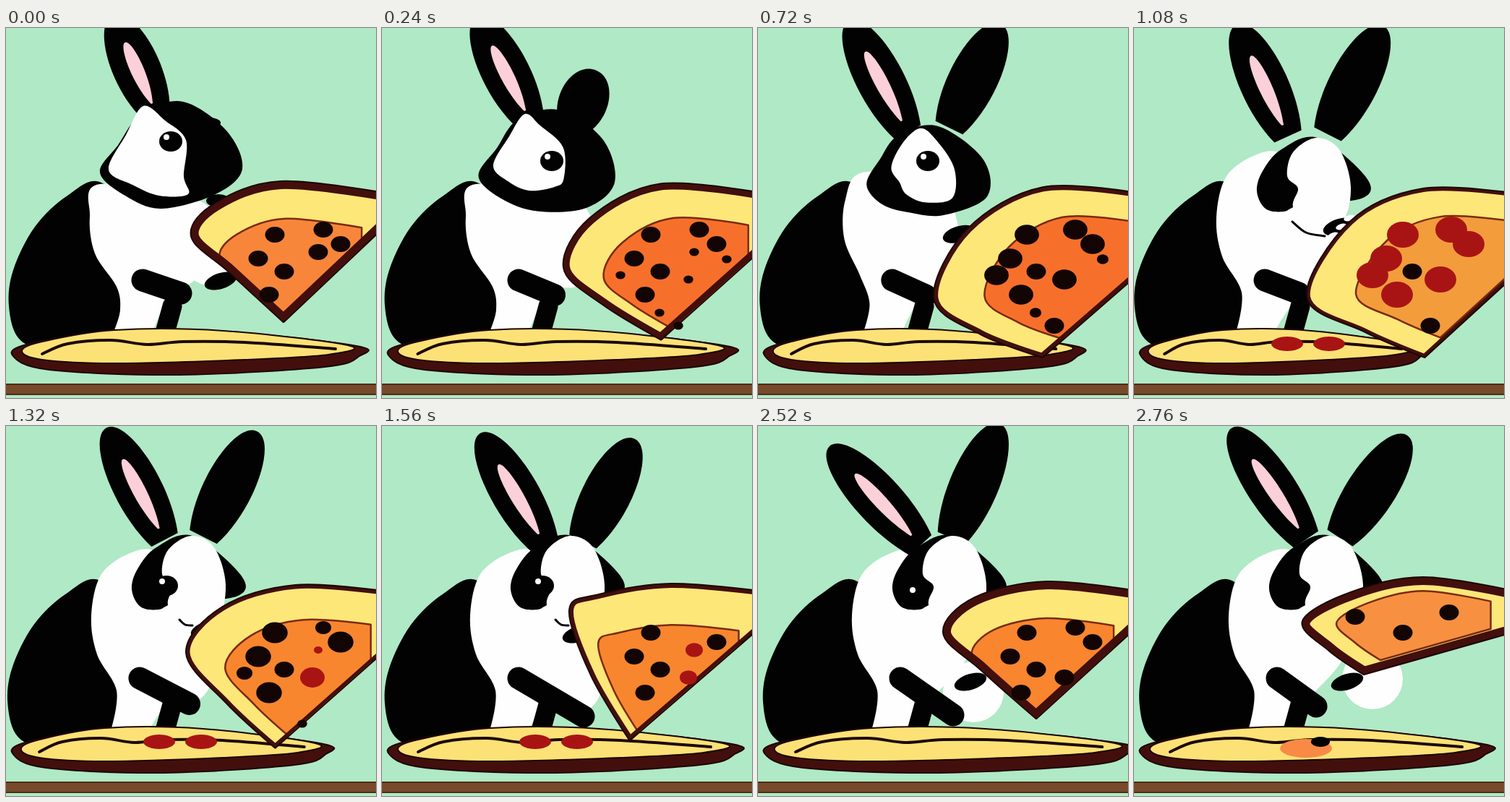
Animation, 512 px wide and 512 px high, one loop 2.88 s. Source, as an HTML page with a canvas:

```html
<!DOCTYPE html>
<html lang="en">
<head>
<meta charset="utf-8">
<title>Rabbit and pizza</title>
<style>
  html, body { margin: 0; width: 100%; height: 100%; overflow: hidden; background: #b0e9c5 }
  canvas { display: block; width: 512px; height: 512px }
</style>
</head>
<body>
<canvas id="stage" width="512" height="512"></canvas>
<script>
const ctx = document.getElementById('stage').getContext('2d');
const LOOP = 2880, STEP = 120;
const BLACK = '#030202', WHITE = '#fefefe', RED = '#a81414', CRUST = '#430f0c', CHEESE = '#fde779';

// Outlines are "x y" points of smooth curves; "!" marks a sharp corner.
const BODY = '132 214 85 232 40 275 10 335 4 385 18 430 60 445 150 440 190 280';
const SIDE_CHEST = '130 216 116 260 123 312 153 358 158 390 150 418! 204 418! 225 375 265 345 290 300 270 240';
const views = {
  profile: {
    chest: SIDE_CHEST,
    head: '188 118 155 162 130 200 165 232 215 250 290 230 327 195 305 142 245 102',
    face: '190 108 166 148 142 196 175 217 212 232 252 230 246 205 249 155 220 128'
  },
  turned: {
    chest: SIDE_CHEST,
    head: '188 135 163 170 137 210 165 240 215 257 275 268 317 232 305 165 245 125',
    face: '205 130 186 152 166 185 175 208 195 218 225 210 257 212 252 175 218 142'
  },
  front: {
    chest: '178 175 136 205 122 262 130 316 157 366 150 418! 204 418! 225 385 285 310 262 220 215 175',
    head: '212 168 186 198 178 226 190 250 215 254 240 245 325 235 328 205 262 152',
    face: '260 152 228 172 220 205 235 222 228 248 248 288 295 270 308 220 292 168'
  }
};
const RIM = '9 453 32 437 140 421 300 420 484 440 488 454 440 469 240 480 60 473';
const PLATE_CHEESE = '22 447 50 434 150 418 300 419 472 439 445 452 330 459 150 464 50 459';
const PLATE_LINE = '50 451 85 437 145 432 195 438 245 434 330 435 455 444';
const TOPPINGS = '349 319 372 286 439 279 463 299 385 337 364 369 424 348 330 342 384 394 410 412 477 320 432 310 306 264 436 258';

// ears: base and tip of each; slice: left, shoulder, top, tip, lower edge;
// tops: one letter per topping place (b black, r red).
const poses = [
  { time: 0, view: 'profile', sway: '0', color: '#f8863a', tops: 'bbbbbb.....b..',
    earL: '208 118 148 -18', earR: '265 145 262 125', eye: '222 151',
    thigh: '285 315', hand: '242 367', paw: '297 350', nose: true,
    slice: '257 288 290 243 380 213 384 406 310 338', right: '268',
    sauce: '395 395', rim: '10', plate: '490' },
  { time: 480, view: 'turned', sway: '0', color: '#f7702b', tops: 'bbbbbbbbbbb...',
    earL: '203 140 115 -14', earR: '262 132 330 -8', eye: '229 178',
    thigh: '230 320', hand: '235 372', paw: '274 292',
    slice: '247 375 285 285 390 220 388 455 300 425', right: '335',
    sauce: '500 370', rim: '6', plate: '473' },
  { time: 1080, view: 'front', sway: '-8', color: '#f39c3c', tops: 'rrrrbrrr.b....', big: 22,
    earL: '213 150 142 -5', earR: '268 147 345 -3', mouth: '219 268 238 283 264 288',
    thigh: '225 330', hand: '228 367', paw: '284 275', toes: true, reds: true,
    slice: '240 372 300 268 400 223 402 455 320 420', right: '338',
    sauce: '480 360', rim: '4', plate: '398' },
  { time: 1560, view: 'front', sway: '0', color: '#f8862e', tops: 'bb.bbbr....r..', big: 12,
    earL: '226 165 136 10', earR: '278 160 350 18', eye: '216 215', mouth: '240 268 248 275 258 276',
    thigh: '262 358', hand: '279 402', paw: '272 288', reds: true,
    slice: '260 255 300 234 400 219 343 434 290 345', right: '272',
    sauce: '400 420', rim: '5', plate: '489' },
  { time: 2040, view: 'front', sway: '11', color: '#f97c24', tops: 'bbbbbbbb......',
    earL: '226 172 103 33', earR: '278 160 335 -2',
    thigh: '268 362', hand: '278 402', paw: '300 246',
    slice: '264 275 310 243 410 219 343 433 292 352', right: '268',
    sauce: '390 400', rim: '5', plate: '488' },
  { time: 2520, view: 'front', sway: '8', color: '#f9852f', tops: 'bbbbbbb.......',
    earL: '225 165 99 28', earR: '268 155 335 -3', eye: '214 227',
    thigh: '298 368', hand: '270 400', paw: '294 354',
    slice: '257 286 300 238 400 216 385 404 310 338', right: '272',
    sauce: '395 395', rim: '10', plate: '512' },
  { time: 2760, view: 'front', sway: '9', color: '#f79141', tops: '.b..........bb',
    earL: '238 157 135 3', earR: '285 155 378 13',
    thigh: '330 350', hand: '252 388', paw: '295 354', melt: true,
    slice: '234 270 300 231 400 210 318 343 270 310', right: '283',
    sauce: '400 275', rim: '10', plate: '488' }
];

const mix = (a, b, k) => a + (b - a) * k;
const numbers = text => text.split(' ').map(parseFloat);

function points(text) {
  const raw = text.split(' '), list = [];
  for (let i = 0; i < raw.length; i += 2) {
    list.push([parseFloat(raw[i]), parseFloat(raw[i + 1]), raw[i + 1].endsWith('!')]);
  }
  return list;
}

const blend = (a, b, k) => points(a).map(([x, y, corner], i) => {
  const to = points(b)[i];
  return [mix(x, to[0], k), mix(y, to[1], k), corner];
});

const shift = (list, dx) => list.map(([x, y, corner]) => [x + dx, y, corner]);

function trace(list, closed = true) {
  const n = list.length;
  const at = i => closed ? list[(i + n) % n] : list[Math.max(0, Math.min(n - 1, i))];
  const handle = (i, side) => [0, 1].map(d =>
    at(i)[d] + (at(i)[2] ? 0 : side * (at(i + 1)[d] - at(i - 1)[d]) / 6));
  ctx.beginPath();
  ctx.moveTo(list[0][0], list[0][1]);
  for (let i = 0; i < (closed ? n : n - 1); i++) {
    ctx.bezierCurveTo(...handle(i, 1), ...handle(i + 1, -1), at(i + 1)[0], at(i + 1)[1]);
  }
}

function stroke(color, width) {
  ctx.strokeStyle = color;
  ctx.lineWidth = width;
  ctx.stroke();
}

function fill(list, color, edge, width) {
  trace(list);
  ctx.fillStyle = color;
  ctx.fill();
  if (edge) stroke(edge, width);
}

function oval(color, x, y, rx, ry = rx, turn = 0) {
  ctx.beginPath();
  ctx.ellipse(x, y, rx, ry, turn, 0, 2 * Math.PI);
  ctx.fillStyle = color;
  ctx.fill();
}

function leaf(color, bx, by, tx, ty, width, foot) {
  const length = Math.hypot(tx - bx, ty - by);
  const nx = (by - ty) / length * width, ny = (tx - bx) / length * width;
  const spot = (along, side) => [mix(bx, tx, along) + nx * side, mix(by, ty, along) + ny * side];
  ctx.beginPath();
  ctx.moveTo(...spot(0, -foot));
  ctx.bezierCurveTo(...spot(.4, -1.1), ...spot(1, -.75), tx, ty);
  ctx.bezierCurveTo(...spot(1, .75), ...spot(.4, 1.1), ...spot(0, foot));
  ctx.fillStyle = color;
  ctx.fill();
}

function limb(x1, y1, x2, y2, width) {
  ctx.beginPath();
  ctx.moveTo(x1, y1);
  ctx.lineTo(x2, y2);
  stroke(BLACK, width);
}

function drawPlate(right, { reds, melt }) {
  const stretch = text => points(text).map(([x, y]) => [9 + (x - 9) * (right - 9) / 480, y]);
  fill(stretch(RIM), CRUST, '#1c0505', 2);
  fill(stretch(PLATE_CHEESE), '#fce276', '#1c0505', 2);
  trace(stretch(PLATE_LINE), false);
  stroke('#1c0805', 4);
  if (reds) for (const x of [212, 270]) oval(RED, x, 437, 22, 10);
  if (melt) {
    oval('#f88a45', 238, 446, 36, 13);
    oval(BLACK, 258, 437, 13, 7);
  }
}

function drawSlice(outline, right, [ax, ay], rim, color) {
  const [left, shoulder, top, tip, lower] = outline;
  const corner = ([x, y]) => [x, y, true];
  const crust = [left, shoulder, top, corner([530, 230]), corner([530, right]), corner(tip), lower];
  fill(crust, CHEESE, '#1c0505', 4);
  ctx.save();
  trace(crust);
  ctx.clip();
  fill(crust.map(([x, y, c]) => [mix(x, ax, .28), mix(y, ay, .28), c]), color, '#7c2a10', 2.5);
  trace(crust);
  stroke(CRUST, rim * 2);
  ctx.restore();
}

function draw(time) {
  const index = poses.findLastIndex(p => p.time <= time);
  const a = poses[index], b = poses[(index + 1) % poses.length];
  const k = (time - a.time) / ((b.time || LOOP) - a.time);
  const near = k < .5 ? a : b;
  const values = name => {
    const to = numbers(b[name]);
    return numbers(a[name]).map((v, i) => mix(v, to[i], k));
  };
  const [sway] = values('sway');
  const part = name => shift(blend(views[a.view][name], views[b.view][name], k), sway);

  ctx.fillStyle = '#b0e9c5';
  ctx.fillRect(0, 0, 512, 512);
  ctx.fillStyle = '#4f2d18';
  ctx.fillRect(0, 492, 512, 16);
  ctx.fillStyle = '#774a2c';
  ctx.fillRect(0, 494, 512, 12);

  fill(shift(points(BODY), sway * .4), BLACK);
  fill(part('chest'), WHITE);
  oval(WHITE, ...values('thigh'), 42);

  leaf(BLACK, ...values('earR'), 42, .5);
  const [bx, by, tx, ty] = values('earL');
  leaf(BLACK, bx, by, tx, ty, 41, .5);
  fill(part('head'), BLACK);
  leaf('#fbd0d8', mix(bx, tx, .1), mix(by, ty, .1), mix(bx, tx, .72), mix(by, ty, .72), 13, .1);
  fill(part('face'), WHITE);
  if (near.mouth) {
    trace(points(near.mouth), false);
    stroke(BLACK, 3);
  }
  if (near.eye) {
    const [x, y] = numbers(near.eye);
    oval(BLACK, x + 6, y + 6, 16, 14);
    oval(WHITE, x, y, 4);
  }
  if (near.nose) oval(BLACK, 294, 239, 17, 9);

  limb(189 + sway, 349, ...values('hand'), 31);
  limb(230, 385, 219, 425, 27);
  oval(BLACK, ...values('paw'), 23, 11, -.3);
  if (near.toes) for (let i = 0; i < 3; i++) oval(WHITE, 276 + 11 * i, 287 - 12 * i, 8, 4, -.3);

  drawPlate(values('plate')[0], near);
  drawSlice(blend(a.slice, b.slice, k), values('right')[0], values('sauce'), values('rim')[0], near.color);
  points(TOPPINGS).forEach(([x, y], i) => {
    const size = pose => ({ b: 13.5, r: pose.big })[pose.tops[i]] || 0;
    const r = mix(size(a), size(b), k);
    oval(near.tops[i] === 'r' ? RED : '#120504', x, y, r, r * .82);
  });
}

ctx.lineJoin = ctx.lineCap = 'round';
function tick() {
  draw(Math.floor(performance.now() % LOOP / STEP) * STEP);
  requestAnimationFrame(tick);
}
tick();
</script>
</body>
</html>
```
